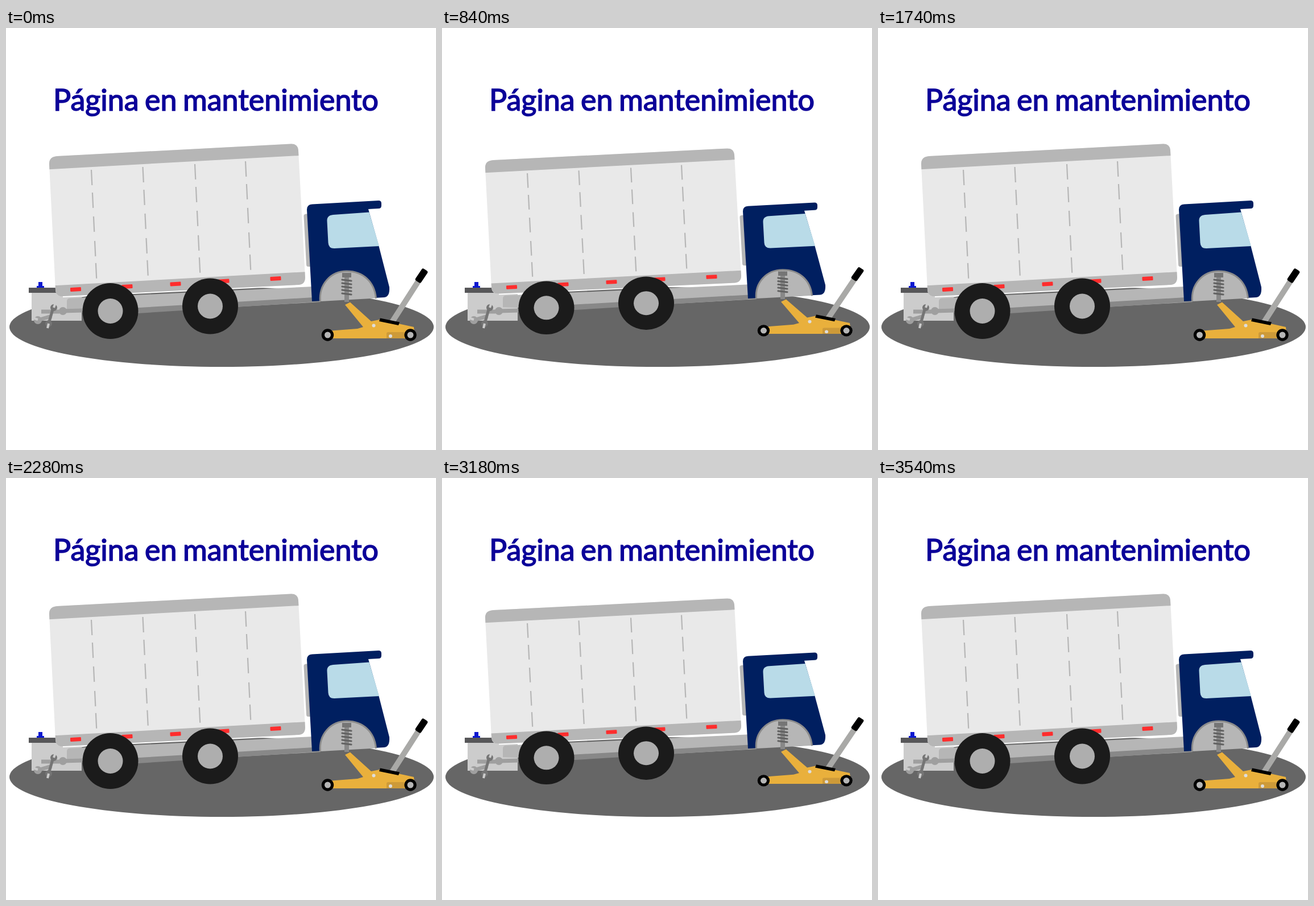
Animation of 756x741 px, one loop 3600 ms. Source, as an HTML page:

```html
<!DOCTYPE html>
<html lang="es">
<head>
<meta charset="utf-8">
<title>Página en mantenimiento</title>
<style>
  html, body { margin: 0; width: 100%; height: 100%; overflow: hidden; background: #fff; }
  svg { display: block; width: 756px; height: 741px; }
  text { font: 400 52px Lato, sans-serif; fill: #0b0099; stroke: #0b0099; stroke-width: 1.5px; }
</style>
</head>
<body>
<svg viewBox="0 0 756 741">
  <defs>
    <g id="wheel"><circle r="49" fill="#1b1b1b"/><circle r="22" fill="#aeaeae"/></g>
    <g id="caster"><circle r="10.7"/><circle r="5.5" fill="#b6b6b6"/></g>
    <path id="divider" d="M0 0L9.2 191" stroke="#b6b6b6" stroke-width="2.2" stroke-dasharray="27 13 27 15 27 16 27 12 27"/>
    <rect id="light" x="-9.5" y="-3.5" width="19" height="7" rx="1.2" fill="#ff2d2d" transform="rotate(-3)"/>
    <clipPath id="box"><path d="M76 240Q75 226 90 225L501 203.500Q513 203 514 215L526 438Q526 450 515 451L100 471Q88 472 87 460Z"/></clipPath>
  </defs>

  <text y="145"><tspan x="83">Página</tspan> <tspan x="244">en</tspan> <tspan x="311">mantenimiento</tspan></text>

  <ellipse cx="379" cy="525" rx="373" ry="70" fill="#666"/>
  <path d="M45 465H133V514H45Z" fill="#ccc"/>
  <path d="M40 456H135V465H40Z" fill="#575759"/>
  <path d="M57 446H64V453H67V456H54V453H57Z" fill="#0a18d0"/>

  <g id="truck">
    <path d="M100 468L524 447V452.500L100 473Z" fill="#fff"/>
    <path d="M112 474.500L540 454L553 481L230 500L107 496V480Q107 475 112 474.500Z" fill="#b6b6b6"/>
    <path d="M200 493L540 473L553 480.500L200 503Z" fill="#888"/>

    <g clip-path="url(#box)">
      <path d="M70 200H530V475H70Z" fill="#e9e9e9"/>
      <path d="M70 200H530V223.200L70 248.400ZM70 453L530 428V475H70Z" fill="#b6b6b6"/>
    </g>
    <use href="#divider" x="150" y="249"/>
    <use href="#divider" x="240.500" y="244"/>
    <use href="#divider" x="332" y="239"/>
    <use href="#divider" x="421" y="234"/>
    <use href="#light" x="122.500" y="459"/>
    <use href="#light" x="213" y="454"/>
    <use href="#light" x="298" y="449.500"/>
    <use href="#light" x="383" y="444.500"/>
    <use href="#light" x="474" y="440"/>
    <use href="#wheel" x="183.500" y="497"/>
    <use href="#wheel" x="359" y="488.500"/>

    <path d="M523.500 330Q523.500 327 527 326.500H530L535 419H531Q528 419 528 415Z" fill="#b6b6b6"/>
    <path d="M529 319Q529 310 538 309.500L655 303Q660 303 660 308V312Q660 317 655 317L637 318L655.500 383L674 455Q675 472 665 473L538 480Z" fill="#001f60"/>
    <path d="M638.500 323.500L656 383L577 387Q567 387 566.500 377L564.500 339Q564 329 575 328Z" fill="#b9dbe8"/>
    <path d="M552.500 480C550 451 570 427 599 427C628 427 648 446 650.500 474.500Z" fill="#b6b6b6"/>
    <path d="M552.500 480C550 451 570 427 599 427C628 427 648 446 650.500 475" fill="none" stroke="#8b8b8b" stroke-width="3"/>
    <path d="M595 430H603V481H595Z" fill="#888"/>
    <path d="M591 430H607V438H591Z" fill="#757575"/>
    <path d="M591 442L607 444M591 448L607 450M591 454L607 456M591 460L607 462M591 466L607 468" stroke="#626262" stroke-width="3.200" stroke-linecap="round"/>

    <path d="M679 516L726 443" stroke="#a9a9a7" stroke-width="10"/>
    <rect x="-12.500" y="-6" width="25" height="12" rx="3" transform="translate(730.500 435) rotate(-56)"/>
    <path d="M596 486L605 481.500L642 515L657 512L717 525L719 545H566V532L618 528L628 525Z" fill="#e9b03c"/>
    <path d="M669 545V537Q669 534 672 534H700V545Z" fill="#cd9a39"/>
    <path d="M658 509.500L692 516.500L690 522L656 515Z"/>
    <circle cx="646.500" cy="522.500" r="3" fill="#ddd"/>
    <circle cx="676" cy="541" r="3" fill="#ddd"/>
    <use href="#caster" x="565.500" y="539"/>
    <use href="#caster" x="711" y="539"/>
  </g>

  <g id="wrenches" fill="none">
    <path d="M62 498H94M100 497L134 496M56 513L80 506" stroke="#9f9f9f" stroke-width="7"/>
    <path d="M100 497h0M56 513h0" stroke="#9f9f9f" stroke-width="14" stroke-linecap="round"/>
    <path d="M83 491L75 519" stroke="#757575" stroke-width="5"/>
    <path d="M84 491h0M75 519h0" stroke="#757575" stroke-width="12" stroke-linecap="round"/>
    <path d="M84 491L87 483M75 519L73 527M56 512L47 509" stroke="#ccc" stroke-width="4"/>
  </g>
</svg>
<script>
  const HALF = 900, LEAD = 60, PIVOT = 376, SQUASH = 0.953;
  const truck = document.getElementById('truck');

  function draw(now) {
    const low = Math.floor((now + LEAD) / HALF) % 2;
    const scale = low ? SQUASH : 1;
    truck.setAttribute('transform', `translate(0 ${PIVOT * (1 - scale)}) scale(1 ${scale})`);
    requestAnimationFrame(() => draw(performance.now() - start));
  }

  const start = performance.now();
  draw(0);
</script>
</body>
</html>
```
